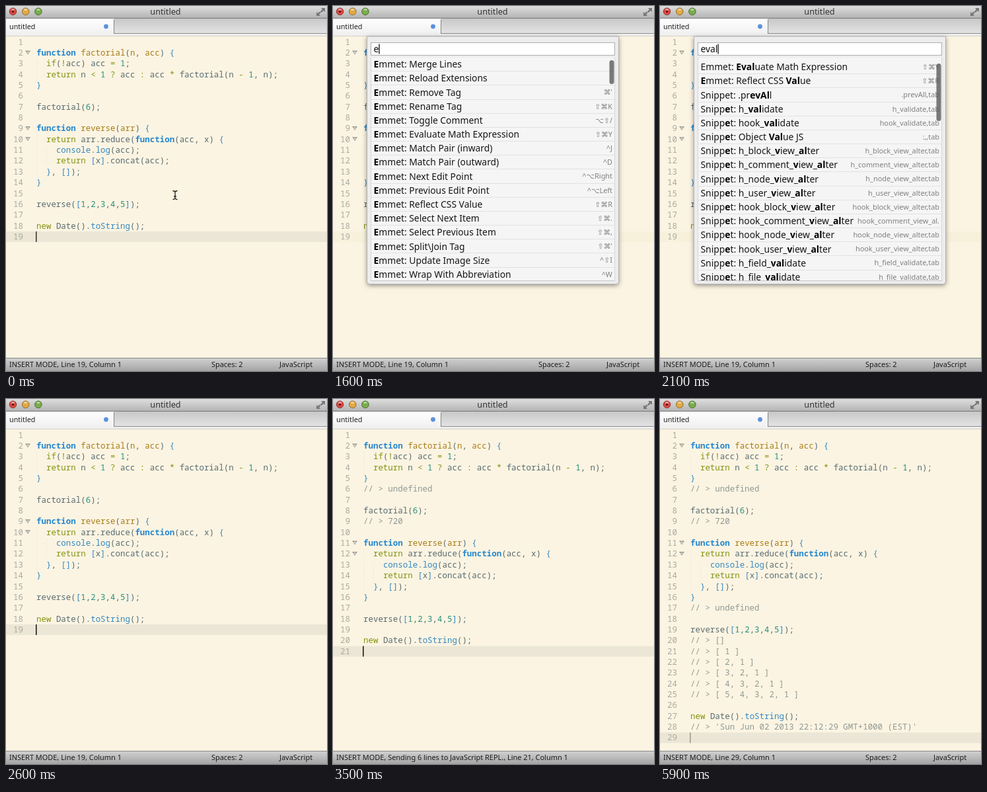
An HTML page with a canvas that plays this animation: 486 px wide and 552 px high, repeating every 6000 ms.

```html
<!DOCTYPE html>
<html lang="en">
<head>
<meta charset="utf-8">
<title>untitled</title>
<style>
  html, body { margin: 0; width: 100%; height: 100%; overflow: hidden; background: #fcf4e2; }
  canvas { display: block; }
</style>
</head>
<body>
<canvas id="stage" width="486" height="552"></canvas>
<script>
const ctx = document.getElementById('stage').getContext('2d');
const W = 486, H = 552, LOOP = 6000;
const UI = '"Noto Sans", "Open Sans", sans-serif';
const SYMBOLS = '"Noto Sans", "DejaVu Sans", sans-serif';
const MONO = '12.45px "Noto Sans Mono", "DejaVu Sans Mono", monospace';
const CHAR = 7.47, LINE = 16.35, CODE_X = 46, FIRST_BASE = 58.6;

const PALETTE_OPEN = 1500, PALETTE_CLOSE = 2500;
const KEYS = [[2000, 'eval'], [1900, 'eva'], [1800, 'ev'], [1600, 'e'], [0, '']];
const SENT = [[4500, ''], [3800, '1 line'], [3500, '6 lines'], [3200, '1 line'], [2900, '4 lines'], [0, '']];
const latest = (steps, t) => steps.find(([start]) => t >= start)[1];

// Each line is [text, time it appears].
const reversed = [1, 2, 3, 4, 5].map(n =>
  [`// > [ ${Array.from({ length: n }, (_, i) => n - i).join(', ')} ]`, 3900]);
const DOCUMENT = [
  [''],
  ['function factorial(n, acc) {'],
  ['  if(!acc) acc = 1;'],
  ['  return n < 1 ? acc : acc * factorial(n - 1, n);'],
  ['}'],
  ['// > undefined', 3000],
  [''],
  ['factorial(6);'],
  ['// > 720', 3300],
  [''],
  ['function reverse(arr) {'],
  ['  return arr.reduce(function(acc, x) {'],
  ['    console.log(acc);'],
  ['    return [x].concat(acc);'],
  ['  }, []);'],
  ['}'],
  ['// > undefined', 3600],
  [''],
  ['reverse([1,2,3,4,5]);'],
  ['// > []', 3900],
  ...reversed,
  [''],
  ['new Date().toString();'],
  ["// > 'Sun Jun 02 2013 22:12:29 GMT+1000 (EST)'", 4500],
  ['']
];

const TOKENS = [
  ['#8f9995', /\/\/.*/y],
  ['#2487cf', /function\b/y, 'bold '],
  ['#a67c16', /(?<=function )\w+|(?<=function \w+\([^)]*)\w+/y],
  ['#82930c', /(?:if|return|new)\b|[=!<>?:*-]/y],
  ['#259079', /\d+/y],
  ['#3488c2', /(?:console|log|toString)\b|[[\]{}]/y],
  ['#586b70', /\w+|\s+|./y]
];

const COMMANDS = [
  ['Merge Lines', ''], ['Reload Extensions', ''], ['Remove Tag', "⌘'"], ['Rename Tag', '⇧⌘K'],
  ['Toggle Comment', '⌥⇧/'], ['Evaluate Math Expression', '⇧⌘Y'], ['Match Pair (inward)', '^J'],
  ['Match Pair (outward)', '^D'], ['Next Edit Point', '^⌥Right'], ['Previous Edit Point', '^⌥Left'],
  ['Reflect CSS Value', '⇧⌘R'], ['Select Next Item', '⇧⌘.'], ['Select Previous Item', '⇧⌘,'],
  ['Split\\Join Tag', "⇧⌘'"], ['Update Image Size', '^⇧I'], ['Wrap With Abbreviation', '^W']
].map(([name, keys]) => ['Emmet: ' + name, keys]);

const SNIPPETS = ['.prevAll', 'h_validate', 'hook_validate', 'Object Value JS',
  ...['h', 'hook'].flatMap(p => ['block', 'comment', 'node', 'user'].map(s => `${p}_${s}_view_alter`)),
  'h_field_validate', 'h_file_validate'
].map(name => ['Snippet: ' + name,
  name === 'Object Value JS' ? ':,,tab'
    : name === 'hook_comment_view_alter' ? 'hook_comment_view_al.' : name + ',tab']);
const MATCHES = [COMMANDS[5], COMMANDS[10], ...SNIPPETS];

function rect(x, y, w, h, fill) {
  ctx.fillStyle = fill;
  ctx.fillRect(x, y, w, h);
}

function shade(y, h, top, bottom, x = 0, w = W) {
  const fill = ctx.createLinearGradient(0, y, 0, y + h);
  fill.addColorStop(0, top);
  fill.addColorStop(1, bottom);
  rect(x, y, w, h, fill);
}

function text(str, x, y, font, fill, align = 'left') {
  ctx.font = font;
  ctx.fillStyle = fill;
  ctx.textAlign = align;
  ctx.fillText(str, x, y);
}

function shape(points, fill) {
  ctx.beginPath();
  points.forEach(([x, y]) => ctx.lineTo(x, y));
  ctx.closePath();
  ctx.fillStyle = fill;
  ctx.fill();
}

function disc(x, y, r, fill, stroke) {
  ctx.beginPath();
  ctx.arc(x, y, r, 0, 7);
  ctx.fillStyle = fill;
  ctx.fill();
  if (stroke) {
    ctx.lineWidth = 1;
    ctx.strokeStyle = stroke;
    ctx.stroke();
  }
}

function rounded(x, y, w, h, r, fill) {
  ctx.beginPath();
  ctx.roundRect(x, y, w, h, r);
  ctx.fillStyle = fill;
  ctx.fill();
}

function drawCode(line, base) {
  const indent = line.search(/\S|$/);
  for (let col = 0; col < indent; col += 2) {
    for (let dy = -11; dy < 5; dy += 3) rect(CODE_X + col * CHAR, base + dy, 1, 1, '#eae2cd');
    rect(CODE_X + (col + 1.5) * CHAR, base - 4, 1, 1, '#e0d9c6');
  }
  for (let col = indent; col < line.length;) {
    for (const [color, pattern, weight = ''] of TOKENS) {
      pattern.lastIndex = col;
      const found = pattern.exec(line);
      if (!found) continue;
      text(found[0], CODE_X + col * CHAR, base, weight + MONO, color);
      col += found[0].length;
      break;
    }
  }
}

function caretAlpha(t) {
  const wave = peak => 0.5 + 0.5 * Math.cos((t - peak) / 1200 * 2 * Math.PI);
  if (t < PALETTE_OPEN) return wave(150);
  return t < 5050 ? 1 : wave(5050);
}

function drawEditor(lines, t, paletteOpen) {
  rect(0, 46, W, 487, '#fcf4e2');
  const last = lines.length - 1;
  rect(0, FIRST_BASE + last * LINE - 12, W, 16, paletteOpen ? '#f7f1dc' : '#ebe6d5');
  lines.forEach((line, i) => {
    const base = FIRST_BASE + i * LINE;
    text(i + 1, 26, base, MONO, '#a8aaa2', 'right');
    if (/function/.test(line)) {
      const y = base - 7.5;
      shape([[29, y], [37, y], [33, y + 6]], '#9a9c98');
      shape([[31, y + 1.5], [35, y + 1.5], [33, y + 4.6]], '#dedccf');
    }
    drawCode(line, base);
  });
  if (!paletteOpen) {
    ctx.globalAlpha = caretAlpha(t);
    rect(45, FIRST_BASE + last * LINE - 12, 1.5, 16, '#111');
    ctx.globalAlpha = 1;
  }
  if (t < PALETTE_OPEN) drawPointer(256, 286);
}

function drawPointer(x, y) {
  ctx.beginPath();
  for (const s of [-1, 1]) {
    ctx.moveTo(x - 3.5, y + 6.5 * s);
    ctx.quadraticCurveTo(x, y + 6.5 * s, x, y + 4 * s);
    ctx.quadraticCurveTo(x, y + 6.5 * s, x + 3.5, y + 6.5 * s);
  }
  ctx.moveTo(x, y - 5);
  ctx.lineTo(x, y + 5);
  ctx.moveTo(x - 2, y + 2);
  ctx.lineTo(x + 2, y + 2);
  ctx.lineWidth = 1.3;
  ctx.strokeStyle = '#222';
  ctx.stroke();
}

function drawWindow() {
  shade(0, 18, '#dedede', '#b4b4b4');
  rect(0, 18, W, 1, '#777');
  [['#de4a42', '#8e302b'], ['#e3a944', '#8f6a24'], ['#79ad4c', '#4a6f2d']].forEach(([fill, edge], i) => {
    const x = 10.5 + 19.2 * i;
    disc(x, 8.3, 5.3, fill, edge);
    ctx.globalAlpha = 0.5;
    rounded(x - 2.5, 4.2, 5, 2.5, 1.2, '#fff');
    ctx.globalAlpha = 1;
  });
  disc(10.5, 8.5, 1.8, '#6d1511');
  text('untitled', 241.5, 13, `12.7px ${UI}`, '#333', 'center');
  shape([[477, 3], [483, 3], [483, 9], [480.8, 7], [477.5, 10.3], [475.7, 8.5], [479, 5.2]], '#777');
  shape([[470, 9], [472.2, 11], [475, 8.2], [476.8, 10], [474, 12.8], [476, 15], [470, 15]], '#777');
  ctx.lineWidth = 1;
  ctx.strokeStyle = '#d0d0d0';
  ctx.beginPath();
  ctx.moveTo(473.5, 6.5);
  ctx.lineTo(479, 12);
  ctx.stroke();

  shade(19, 23, '#c8c8c8', '#e4e4e4', 164, W - 164);
  rect(164, 41, W - 164, 1, '#8c8c8c');
  shade(19, 26, '#fefefe', '#efefef', 0, 163);
  rect(163, 42, W - 163, 3, '#efefef');
  rect(163, 20, 1, 22, '#858585');
  rect(0, 45, W, 1, '#d5d2ca');
  text('untitled', 5, 35, `10.8px ${UI}`, '#222');
  disc(151.5, 31, 3.4, '#5b92dc');
}

function drawStatus(lineCount, t) {
  shade(533, 19, '#d0d0d0', '#a4a4a4');
  rect(0, 532, W, 1, '#888');
  const font = `10.95px ${UI}`;
  const sent = latest(SENT, t);
  const message = sent && `Sending ${sent} to JavaScript REPL., `;
  text(`INSERT MODE, ${message}Line ${lineCount}, Column 1`, 5, 546, font, '#1c1c1c');
  if (sent) return;
  text('Spaces: 2', 311, 546, font, '#1c1c1c');
  text('JavaScript', 414, 546, font, '#1c1c1c');
}

// Splits a label into [run, isMatch] pairs for the typed query.
function highlight(label, query) {
  if (!query) return [[label, false]];
  const lower = label.toLowerCase();
  const hit = lower.includes(query) ? query : query[0];
  const at = lower.indexOf(hit);
  if (at < 0) return [[label, false]];
  const end = at + hit.length;
  return [[label.slice(0, at), false], [label.slice(at, end), true],
    ...highlight(label.slice(end), query.slice(hit.length))];
}

function drawPalette(query) {
  const filtered = query.length > 1;
  const rows = filtered ? MATCHES : COMMANDS;
  const font = `13.85px ${UI}`;
  const rowHeight = 21.17, top = filtered ? 82 : 78;

  ctx.save();
  ctx.shadowColor = 'rgba(0,0,0,.45)';
  ctx.shadowBlur = 7;
  ctx.shadowOffsetY = 2;
  rounded(51.5, 46, 381, 374.5, [0, 0, 4, 4], '#ededed');
  ctx.restore();
  ctx.lineWidth = 1;
  ctx.strokeStyle = '#b4b4b4';
  ctx.stroke();

  rect(57, 55, 370, 20, '#b0b0b0');
  rect(58, 56, 368, 18, '#fff');
  text(query, 61.5, 70, font, '#111');
  rect(61.5 + ctx.measureText(query).width, 57.5, 1.3, 15, '#111');

  ctx.save();
  ctx.beginPath();
  ctx.rect(57, 78, 370, 337);
  ctx.clip();
  rect(57, 78, 370, 337, '#f5f5f5');
  rows.forEach(([label, keys], i) => {
    const y = top + i * rowHeight;
    rect(57, Math.round(y + rowHeight) - 1, 370, 1, '#e2e2e2');
    let x = 61.5;
    for (const [run, bold] of highlight(label, query)) {
      text(run, x, y + 15.3, (bold ? 'bold ' : '') + font, bold ? '#000' : '#161616');
      x += ctx.measureText(run).width;
    }
    text(keys, 423, y + 14, `10.9px ${SYMBOLS}`, '#808080', 'right');
  });
  ctx.restore();
  rect(57, 78, 1, 337, '#d8d8d8');
  rect(426, 78, 1, 337, '#d8d8d8');
  rect(57, 415, 370, 1, '#c8c8c8');
  rounded(418.5, filtered ? 87 : 82, 7, filtered ? 87 : 36, 3.5, 'rgba(90,90,90,.8)');
}

function draw(t) {
  const lines = DOCUMENT.filter(([, shownAt = 0]) => t >= shownAt).map(([line]) => line);
  const paletteOpen = t >= PALETTE_OPEN && t < PALETTE_CLOSE;
  drawEditor(lines, t, paletteOpen);
  drawWindow();
  drawStatus(lines.length, t);
  if (paletteOpen) drawPalette(latest(KEYS, t));
}

const start = performance.now();
function tick() {
  const t = (performance.now() - start) % LOOP;
  draw(Math.floor(t / 100) * 100);
  requestAnimationFrame(tick);
}
tick();
</script>
</body>
</html>
```
